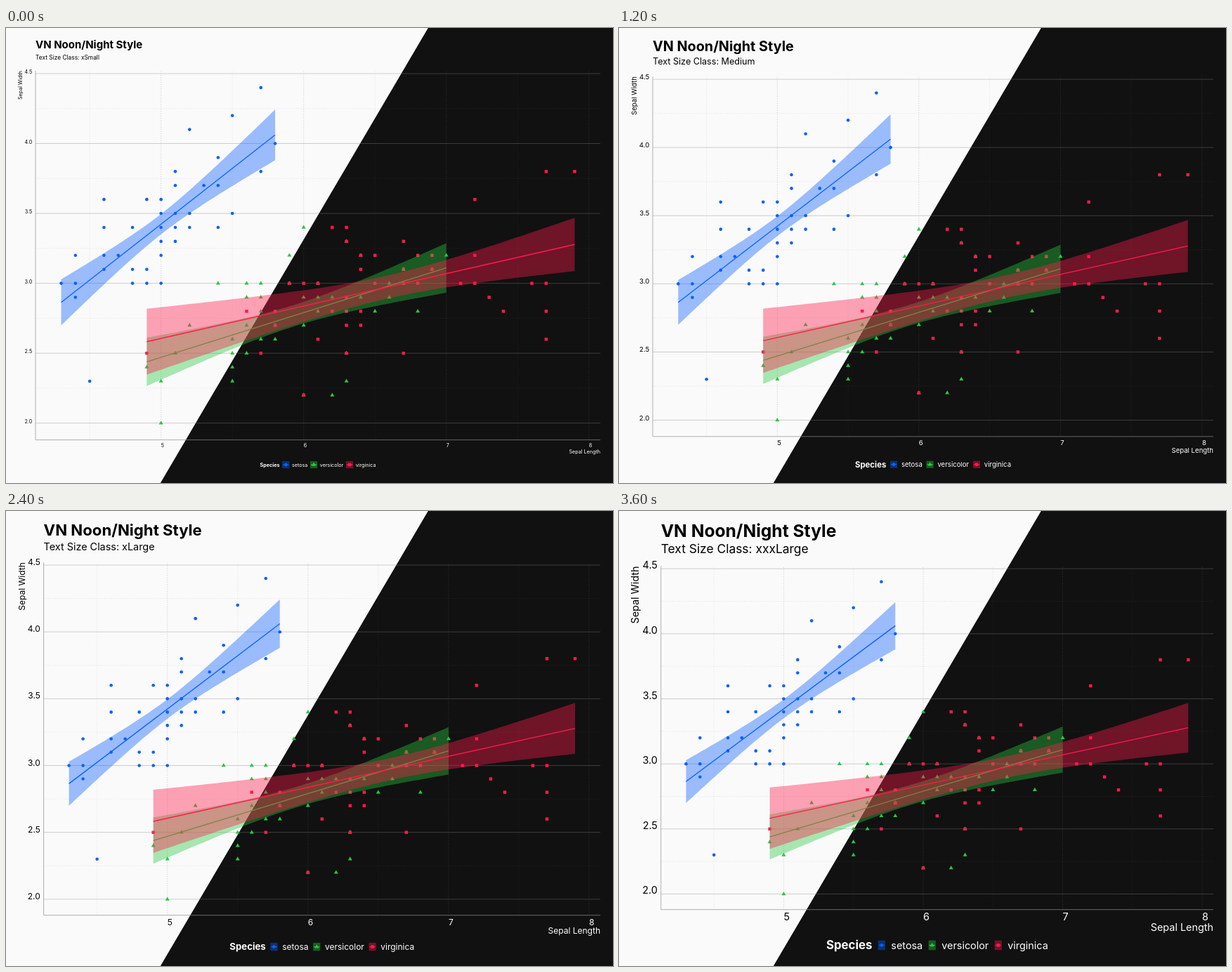
An HTML page with a canvas for the animation above (4200 ms loop, 864 px wide and 648 px high).

```html
<!DOCTYPE html>
<html lang="en">
<head>
<meta charset="utf-8">
<title>Light and dark plot</title>
<style>
  html, body { margin: 0; width: 100%; height: 100%; overflow: hidden; background: #111; }
  canvas { display: block; }
</style>
</head>
<body>
<canvas id="stage" width="864" height="648"></canvas>
<script>
const W = 864, H = 648, RIGHT = 846, STEP = 600;
const ctx = document.getElementById('stage').getContext('2d');

// Font sizes are in px; left, top and bottom bound the plot panel.
const SIZES = [
  { name: 'xSmall',   title: 15,   sub: 8.4,  subY: 44.5, legend: 7.2,  text: 7.2,  left: 42,   top: 61,   bottom: 586.6 },
  { name: 'Small',    title: 15.6, sub: 9,    subY: 45.7, legend: 7.8,  text: 7.2,  left: 42,   top: 62,   bottom: 586.6 },
  { name: 'Medium',   title: 19.8, sub: 12.6, subY: 52,   legend: 11.4, text: 9.6,  left: 48,   top: 69.2, bottom: 581.8 },
  { name: 'Large',    title: 20.4, sub: 13.2, subY: 52.8, legend: 12,   text: 10.8, left: 50.8, top: 70.3, bottom: 579 },
  { name: 'xLarge',   title: 22.2, sub: 14.4, subY: 56,   legend: 13.2, text: 12,   left: 53.6, top: 73.2, bottom: 575.7 },
  { name: 'xxLarge',  title: 23.4, sub: 15.6, subY: 57.5, legend: 14.4, text: 13.2, left: 56.7, top: 75.7, bottom: 572.2 },
  { name: 'xxxLarge', title: 24.6, sub: 17.4, subY: 60.2, legend: 16.8, text: 14.4, left: 59.7, top: 78.5, bottom: 567.7 }
];

const THEMES = [
  { back: '#fafafa', ink: '#000', axis: '#a6a6a6', major: '#c9c9c9', dots: '#cccccc', minor: '#e2e2e2',
    area: [[0, 0], [601, 0], [220, H], [0, H]] },
  { back: '#111111', ink: '#fff', axis: '#707070', major: '#414141', dots: '#343434', minor: '#242424',
    area: [[601, 0], [W, 0], [W, H], [220, H]] }
];

// Sepal lengths in tenths; each row is 0.1 wider than the one before.
const setosaRows = [[45], [], [], [], [], [], [44], [43, 44, 48, 49, 50], [46, 48, 49], [44, 46, 47, 50],
  [50, 51], [46, 48, 50, 51, 52, 54], [50, 51, 52, 55], [46, 49, 50], [51, 53, 54], [51, 57],
  [54], [58], [52], [55], [], [57]];
const versicolorRows = [[50], [], [60, 62], [50, 55, 63], [49, 55], [51, 55, 56, 63], [55, 57, 58],
  [52, 56, 58, 60], [57, 61, 65, 68], [56, 57, 60, 61, 62, 64, 66], [54, 56, 57, 59, 61, 66, 67],
  [67, 69], [59, 64, 70], [63], [60]];
const virginicaRows = [[60], [], [], [49, 57, 63, 67], [61, 77], [58, 63, 64], [56, 58, 62, 63, 64, 74, 77],
  [63, 73], [59, 60, 61, 65, 67, 68, 71, 72, 76, 77], [64, 67, 69], [64, 65, 68, 69, 72],
  [63, 67], [62, 63], [], [72], [], [77, 79]];

// Linear fit: value = a + b * x, residual error s, mean x and sum of squares sxx.
const SPECIES = [
  { name: 'setosa', color: '#0a60ff', mark: dot, base: 2.3, rows: setosaRows,
    from: 4.3, to: 5.8, a: -0.5694, b: 0.7985, s: 0.2565, mean: 5.006, sxx: 6.088 },
  { name: 'versicolor', color: '#28c840', mark: triangle, base: 2, rows: versicolorRows,
    from: 4.9, to: 7, a: 0.8721, b: 0.3197, s: 0.2697, mean: 5.936, sxx: 13.055 },
  { name: 'virginica', color: '#ff1a4b', mark: square, base: 2.2, rows: virginicaRows,
    from: 4.9, to: 7.9, a: 1.4461, b: 0.2319, s: 0.2898, mean: 6.588, sxx: 19.813 }
];

function dot(x, y) {
  ctx.beginPath();
  ctx.arc(x, y, 2.3, 0, Math.PI * 2);
  ctx.fill();
}

function triangle(x, y) {
  tracePath([[x, y - 3.4], [x + 3, y + 1.8], [x - 3, y + 1.8]]);
  ctx.fill();
}

function square(x, y) {
  ctx.fillRect(x - 2.2, y - 2.2, 4.4, 4.4);
}

function tracePath(points) {
  ctx.beginPath();
  points.forEach(([x, y]) => ctx.lineTo(x, y));
}

function line(x1, y1, x2, y2, color, width = 0.9, dash = []) {
  ctx.strokeStyle = color;
  ctx.lineWidth = width;
  ctx.setLineDash(dash);
  tracePath([[x1, y1], [x2, y2]]);
  ctx.stroke();
  ctx.setLineDash([]);
}

function setFont(size, weight = 400) {
  ctx.font = `${weight} ${size}px Inter, sans-serif`;
}

function label(text, x, y, size, align = 'left', weight = 400) {
  setFont(size, weight);
  ctx.textAlign = align;
  ctx.fillText(text, x, y);
}

function textWidth(text, size, weight) {
  setFont(size, weight);
  return ctx.measureText(text).width;
}

function makeScale({ left, top, bottom }) {
  return {
    x: v => left + (v - 4.12) / 3.96 * (RIGHT - left),
    y: v => bottom - (v - 1.88) / 2.64 * (bottom - top)
  };
}

function drawGrid(size, theme, scale) {
  const { left, top, bottom } = size;
  const across = (v, ...style) => line(left, scale.y(v), RIGHT, scale.y(v), ...style);
  const down = (v, ...style) => line(scale.x(v), bottom, scale.x(v), top, ...style);
  for (let v = 2.25; v < 4.5; v += 0.5) across(v, theme.minor, 0.8, [1.2, 2]);
  for (let v = 4.5; v < 8; v++) down(v, theme.minor, 0.8, [1.2, 2]);
  for (let v = 5; v <= 8; v++) down(v, theme.dots, 0.9, [1.2, 2]);
  for (let v = 2; v <= 4.5; v += 0.5) across(v, theme.major);
}

function drawFit(s, scale) {
  const upper = [], lower = [], steps = 79;
  const fit = x => s.a + s.b * x;
  for (let i = 0; i <= steps; i++) {
    const x = s.from + (s.to - s.from) * i / steps;
    const margin = 2.0106 * s.s * Math.sqrt(1 / 50 + (x - s.mean) ** 2 / s.sxx);
    upper.push([scale.x(x), scale.y(fit(x) + margin)]);
    lower.unshift([scale.x(x), scale.y(fit(x) - margin)]);
  }
  ctx.globalAlpha = 0.4;
  ctx.fillStyle = s.color;
  tracePath([...upper, ...lower]);
  ctx.fill();
  ctx.globalAlpha = 1;
  line(scale.x(s.from), scale.y(fit(s.from)), scale.x(s.to), scale.y(fit(s.to)), s.color, 1.3);
}

function drawData(scale) {
  for (const s of SPECIES) {
    ctx.fillStyle = s.color;
    s.rows.forEach((row, i) => {
      row.forEach(x => s.mark(scale.x(x / 10), scale.y(s.base + i / 10)));
    });
  }
  SPECIES.forEach(s => drawFit(s, scale));
}

function drawAxes(size, theme, scale) {
  const { left, top, bottom, text } = size;
  line(left, top, left, bottom, theme.axis);
  line(left, bottom, RIGHT, bottom, theme.axis);
  ctx.fillStyle = theme.ink;
  for (let v = 2; v <= 4.5; v += 0.5) label(v.toFixed(1), left - 4.8, scale.y(v), text, 'right');
  for (let v = 5; v <= 8; v++) label(v, scale.x(v), bottom + 6.3 + 0.63 * text, text);
  label('Sepal Length', RIGHT, bottom + 7.4 + 1.6 * text, text, 'right');
  ctx.save();
  ctx.translate(17.5 + 0.75 * text, top);
  ctx.rotate(-Math.PI / 2);
  label('Sepal Width', 0, 0, text, 'right');
  ctx.restore();
}

function drawLegend({ left, legend, text }, theme) {
  const key = 10.2, gap = legend / 2;
  const mid = Math.min(622, 628.5 - 0.6 * legend);
  const keyHeight = Math.max(key, 0.95 * text);
  const titleWidth = textWidth('Species', legend, 700);
  const widths = SPECIES.map(s => textWidth(s.name, text));
  const total = titleWidth + widths.reduce((sum, w) => sum + w + key + 2 * gap, 0);
  let x = (left + RIGHT - total) / 2;

  ctx.fillStyle = theme.ink;
  label('Species', x, mid + 0.36 * legend, legend, 'left', 700);
  x += titleWidth + gap;
  SPECIES.forEach((s, i) => {
    ctx.fillStyle = s.color;
    s.mark(x + key / 2, mid);
    ctx.globalAlpha = 0.4;
    ctx.fillRect(x, mid - keyHeight / 2, key, keyHeight);
    ctx.globalAlpha = 1;
    line(x + key * 0.1, mid, x + key * 0.9, mid, s.color, 1.3);
    x += key + gap;
    ctx.fillStyle = theme.ink;
    label(s.name, x, mid + 0.36 * text, text);
    x += widths[i] + gap;
  });
}

function drawHalf(size, theme) {
  const scale = makeScale(size);
  ctx.save();
  tracePath(theme.area);
  ctx.clip();
  ctx.fillStyle = theme.back;
  ctx.fillRect(0, 0, W, H);
  drawGrid(size, theme, scale);
  drawData(scale);
  drawAxes(size, theme, scale);
  label('VN Noon/Night Style', size.left, 18 + 0.76 * size.title, size.title, 'left', 700);
  label(`Text Size Class: ${size.name}`, size.left, size.subY, size.sub);
  drawLegend(size, theme);
  ctx.restore();
}

let shown = -1;
function tick() {
  const index = Math.floor(performance.now() / STEP) % SIZES.length;
  if (index !== shown) {
    shown = index;
    ctx.fillStyle = THEMES[1].back;
    ctx.fillRect(0, 0, W, H);
    THEMES.forEach(theme => drawHalf(SIZES[index], theme));
  }
  requestAnimationFrame(tick);
}
tick();
</script>
</body>
</html>
```
